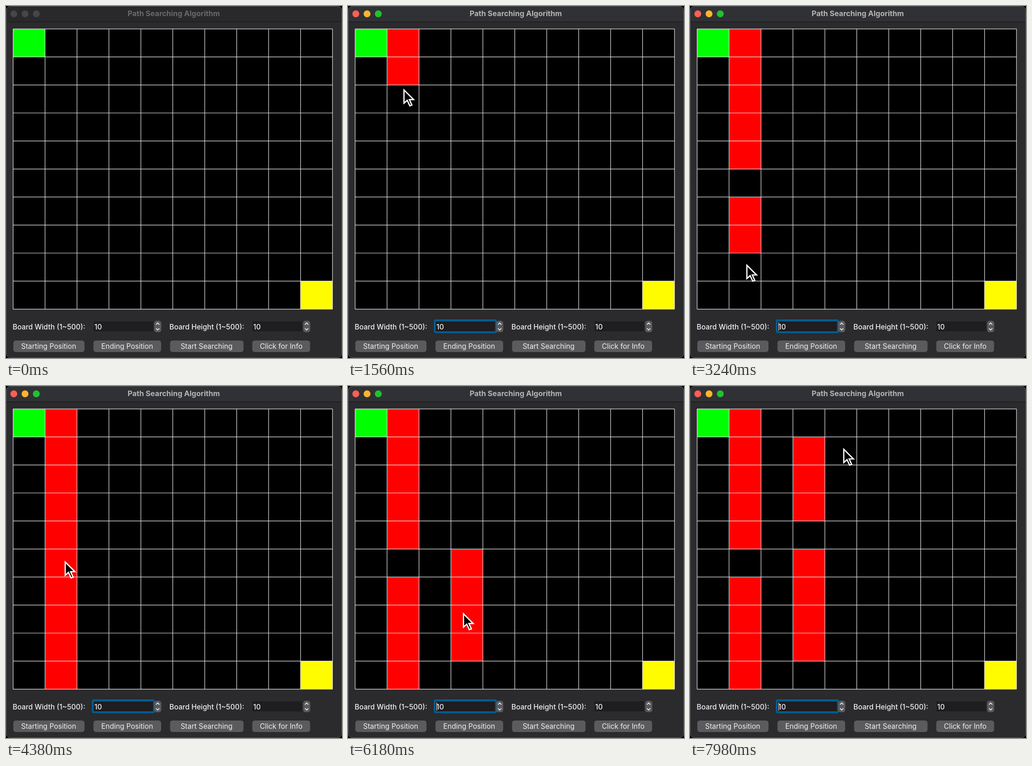
These frames come from a looping animation (732x765 px, 8000 ms). An HTML page with a canvas:

```html
<!DOCTYPE html>
<html lang="en">
<head>
<meta charset="utf-8">
<title>Path Searching Algorithm</title>
<style>
  html, body { margin: 0; width: 100%; height: 100%; overflow: hidden; background: #000; }
  canvas, svg { position: absolute; left: 0; top: 0; display: block; }
  text { font: 400 15.5px Inter, Roboto, sans-serif; fill: #f0eff1; }
  .label { font-weight: 500; }
  .mid { text-anchor: middle; }
  #title { font-weight: 700; font-size: 16.1px; }
</style>
</head>
<body>
<canvas id="stage" width="732" height="765"></canvas>
<svg width="732" height="765">
  <text id="title" class="mid" x="365.5" y="22">Path Searching Algorithm</text>
  <text class="label" x="14.5" y="702.5">Board Width (1~500):</text>
  <text class="label" x="192.5" y="702.5">10</text>
  <text class="label" x="356" y="702.5">Board Height (1~500):</text>
  <text class="label" x="538.5" y="702.5">10</text>
  <text class="mid" x="93" y="744.5">Starting Position</text>
  <text class="mid" x="264" y="744.5">Ending Position</text>
  <text class="mid" x="437" y="744.5">Start Searching</text>
  <text class="mid" x="599.5" y="744.5">Click for Info</text>
</svg>
<script>
const W = 732, H = 765, LOOP = 8000, ACTIVATE = 810, DWELL = 70;
const N = 10, GX = 15.5, GY = 49.8, CW = 69.58, CH = 60.9;
const INK = '#f0eff1', FACE = '#5b5a5d';
const ctx = document.getElementById('stage').getContext('2d');
const title = document.getElementById('title');
const arrow = new Path2D('M1 2.6V31.4L8 25L13.8 37L18.2 35.2L12.7 23.5H22Z');
const chevrons = new Path2D('M-3.7 -4L0 -7.7L3.7 -4M-3.7 4L0 7.7L3.7 4');

const stop = (t, x, y, click = false) => ({ t, x, y, click });

// A run of n evenly spaced clicks
const sweep = (n, t, dt, x, dx, y, dy) =>
  Array.from({ length: n }, (_, i) => stop(t + i * dt, x + i * dx, y + i * dy, true));

const stops = [
  stop(0, 114, -50),
  stop(390, 114, 14),
  stop(ACTIVATE, 118, 70),
  ...sweep(N, 1090, 272, 120.3, .33, 53, 63.5).filter((_, i) => i !== 5),
  stop(3770, 124, 624),
  ...sweep(2, 4310, 290, 128, 0, 380, 0),
  ...sweep(4, 5040, 295, 247, 1, 373, 61),
  ...sweep(3, 6700, 310, 253, 1, 250, -60),
  stop(LOOP, 334, 135)
];

const cellAt = (x, y) => Math.floor((y - GY) / CH) * N + Math.floor((x - GX) / CW);

function pointer(t) {
  const i = stops.findLastIndex(s => s.t <= t), a = stops[i], b = stops[i + 1];
  const p = (t - a.t - DWELL) / (b.t - a.t - 2 * DWELL);
  const q = Math.min(1, Math.max(0, p)), e = q * q * (3 - 2 * q);
  return [a.x + (b.x - a.x) * e, a.y + (b.y - a.y) * e];
}

// Each click toggles the wall under the pointer
function walls(t) {
  const set = new Set();
  for (const s of stops) {
    if (!s.click || s.t > t) continue;
    const cell = cellAt(s.x, s.y);
    if (!set.delete(cell)) set.add(cell);
  }
  return set;
}

function box(x, y, w, h, r, color) {
  ctx.fillStyle = color;
  ctx.beginPath();
  ctx.roundRect(x, y, w, h, r);
  ctx.fill();
}

function line(x1, y1, x2, y2, color, width) {
  ctx.strokeStyle = color;
  ctx.lineWidth = width;
  ctx.beginPath();
  ctx.moveTo(x1, y1);
  ctx.lineTo(x2, y2);
  ctx.stroke();
}

function drawShape(path, x, y, stroke, width, fill) {
  ctx.save();
  ctx.translate(x, y);
  if (fill) {
    ctx.fillStyle = fill;
    ctx.fill(path);
  }
  ctx.strokeStyle = stroke;
  ctx.lineWidth = width;
  ctx.stroke(path);
  ctx.restore();
}

function drawWindow(active) {
  ctx.fillStyle = '#000';
  ctx.fillRect(0, 0, W, H);
  box(0, 0, W, H, 10, '#2b2a2d');
  box(0, 0, W, 34, [10, 10, 0, 0], active ? '#303134' : '#29282b');
  line(0, 34.5, W, 34.5, '#151416', 1);
  ctx.strokeStyle = '#59585b';
  ctx.beginPath();
  ctx.roundRect(.5, .5, W - 1, H - 1, 10);
  ctx.stroke();
  ['#fe5f57', '#feb42c', '#20c231'].forEach((color, i) =>
    box(9.5 + 24.5 * i, 9.5, 15, 15, 7.5, active ? color : '#464548'));
}

function drawCell(i, color) {
  ctx.fillStyle = color;
  ctx.fillRect(GX + i % N * CW, GY + Math.floor(i / N) * CH, CW, CH);
}

function drawBoard(t) {
  ctx.fillStyle = '#000';
  ctx.fillRect(GX, GY, N * CW, N * CH);
  drawCell(0, '#00ff00');
  drawCell(N * N - 1, '#fffc00');
  walls(t).forEach(i => drawCell(i, '#ff0000'));
  for (let i = 0; i <= N; i++) {
    const x = GX + i * CW, y = GY + i * CH;
    line(x, GY, x, GY + N * CH, '#e8e8e8', 1.2);
    line(GX, y, GX + N * CW, y, '#e8e8e8', 1.2);
  }
}

function drawField(x, w) {
  box(x, 685.5, w, 21.5, 0, '#1e1d1f');
  box(x + w + 2.3, 684, 15.5, 25, 5.5, FACE);
  drawShape(chevrons, x + w + 10, 696.5, INK, 1.7);
}

function drawControls(t, active) {
  if (active) box(187, 681, 137.5, 30, 4, '#025d90');
  drawField(191, 129.5);
  drawField(537, 108);
  if (active && (t - ACTIVATE) % 1000 < 500) line(193.5, 688, 193.5, 705.5, INK, 1.2);
  for (const [x, w] of [[16, 155], [190.5, 147.5], [357.5, 160], [536.5, 126]])
    box(x, 727, w, 25, 5.5, FACE);
}

function draw(t) {
  const active = t >= ACTIVATE;
  title.style.fill = active ? '#b5b4b7' : '#69686b';
  drawWindow(active);
  drawBoard(t);
  drawControls(t, active);
  drawShape(arrow, ...pointer(t), '#fff', 2.7, '#000');
}

const start = performance.now();
function tick() {
  draw((performance.now() - start) % LOOP);
  requestAnimationFrame(tick);
}
tick();
</script>
</body>
</html>
```
